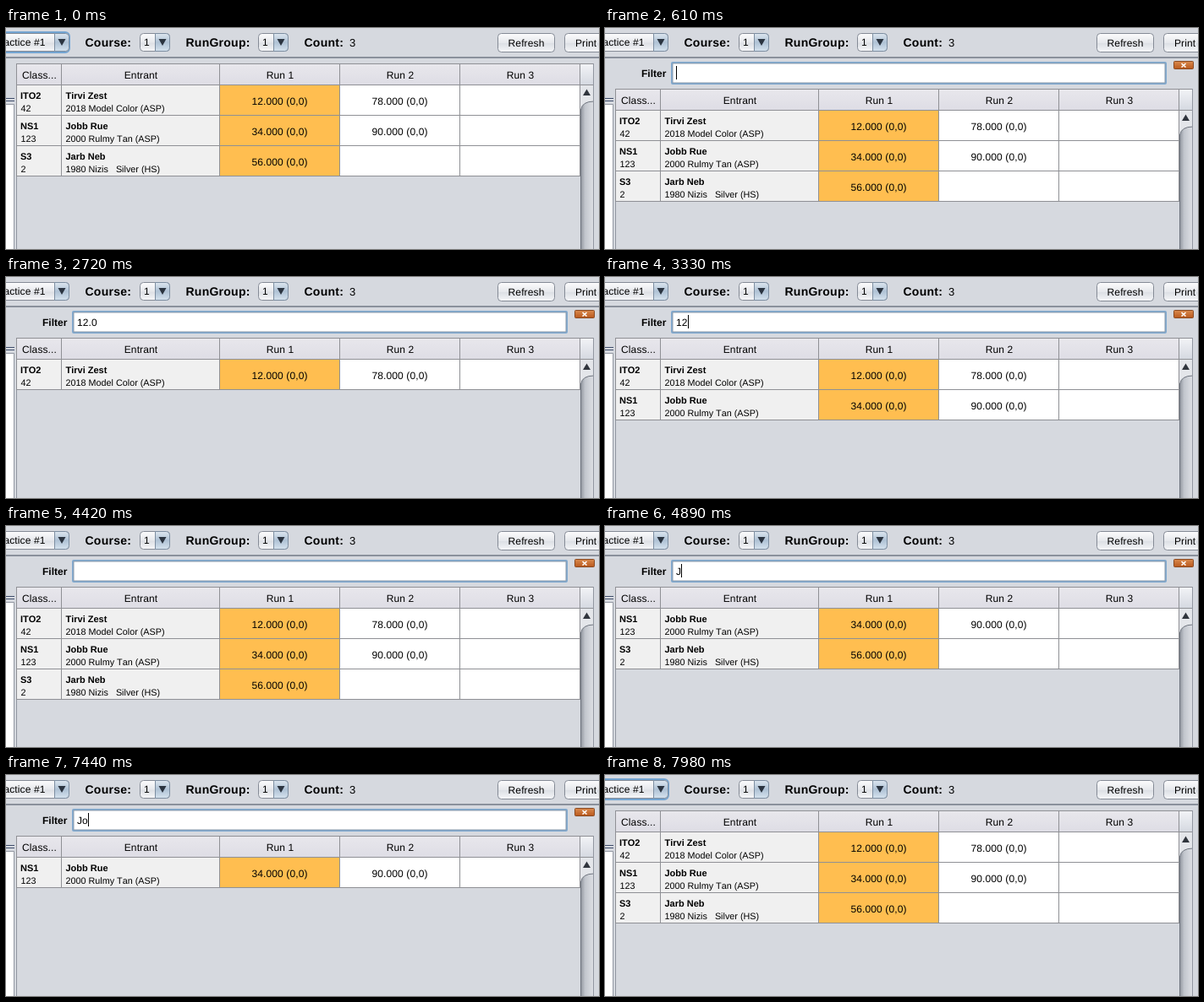
Write an HTML page that moves like this. It is 701 px wide and 262 px high and loops after 8.06 s.

```html
<!DOCTYPE html>
<html lang="en">
<head>
<meta charset="utf-8">
<title>Run table filter</title>
<style>
  html, body { margin: 0; width: 100%; height: 100%; overflow: hidden; background: #d6d9df; }
  svg { display: block; width: 701px; height: 262px; }
  text {
    font: 12px "Liberation Sans", Arial, sans-serif;
    font-kerning: none;
    letter-spacing: .12px;
    text-rendering: geometricPrecision;
    white-space: pre;
  }
  .mid { text-anchor: middle; }
  .label { font-size: 14px; font-weight: bold; letter-spacing: .25px; }
  .bold { font-weight: bold; letter-spacing: 0; }
  .name { font-size: 11px; font-weight: bold; letter-spacing: 0; }
  .small { font-size: 10.8px; letter-spacing: 0; }
</style>
</head>
<body>
<svg viewBox="0 0 701 262">
  <defs>
    <linearGradient id="button" x2="0" y2="1">
      <stop stop-color="#fcfcfd"/><stop offset=".5" stop-color="#e6e8ec"/>
      <stop offset=".55" stop-color="#dde0e5"/><stop offset="1" stop-color="#f6f7f9"/>
    </linearGradient>
    <linearGradient id="arrow" x2="0" y2="1">
      <stop stop-color="#dde6ef"/><stop offset=".5" stop-color="#afc2d5"/>
      <stop offset="1" stop-color="#d5e2ee"/>
    </linearGradient>
    <linearGradient id="head" x2="0" y2="1">
      <stop stop-color="#e8e7ec"/><stop offset="1" stop-color="#dedde5"/>
    </linearGradient>
    <linearGradient id="corner" x2="0" y2="1">
      <stop stop-color="#f3f4f7"/><stop offset="1" stop-color="#d4d8e0"/>
    </linearGradient>
    <linearGradient id="track">
      <stop stop-color="#8b9099"/><stop offset=".35" stop-color="#c2c6cd"/>
      <stop offset="1" stop-color="#dfe1e6"/>
    </linearGradient>
    <linearGradient id="close" x2="0" y2="1">
      <stop stop-color="#d98a4e"/><stop offset="1" stop-color="#b9581c"/>
    </linearGradient>
  </defs>

  <rect width="701" height="262" fill="#d6d9df"/>
  <rect y="34" width="701" height="2" fill="#8a909b"/>
  <path d="M0 83.5H10M0 86.5H10" stroke="#3f4d6b"/>
  <rect y="90" width="9" height="172" fill="#fff"/>
  <path d="M0 90.5H9.5V262" fill="none" stroke="#9297a1"/>

  <g id="toolbar"></g>

  <g id="filter">
    <text class="bold" x="43" y="58">Filter</text>
    <rect x="78" y="40" width="586" height="27" rx="2" fill="#7fa9d0"/>
    <rect x="80" y="42" width="582" height="23" fill="#fff" stroke="#8d9bab"/>
    <text id="query" x="84" y="58"></text>
    <rect id="caret" y="45" width="1" height="16"/>
    <rect x="672.5" y="39.5" width="23" height="9" rx="1" fill="url(#close)" stroke="#8a4a22"/>
    <path d="M681.5 42L686.5 46.5M686.5 42L681.5 46.5" stroke="#fff" stroke-width="1.6"/>
  </g>

  <g id="table"></g>
</svg>

<script>
const $ = id => document.getElementById(id);
const rect = (x, y, w, h, fill, extra = "") =>
  `<rect x="${x}" y="${y}" width="${w}" height="${h}" fill="${fill}" ${extra}/>`;
const text = (x, y, value, style = "") => `<text x="${x}" y="${y}" class="${style}">${value}</text>`;

// Toolbar
const button = (x, w, h = 22) => rect(x + .5, 6.5, w - 1, h, "url(#button)", 'rx="4" stroke="#858b96"');
const combo = (left, right) => button(left, right - left, 21) +
  `<path d="M${right - 17.5} 6.5h13q4 0 4 4v13q0 4 -4 4h-13z" fill="url(#arrow)" stroke="#7d8ea1"/>
   <path d="M${right - 13.5} 13h9l-4.5 8z" fill="#2b3440"/>`;

$("toolbar").innerHTML =
  `<rect id="focus" x="-10" y="5" width="85" height="24" rx="5" fill="none" stroke="#73a4d1" stroke-width="2"/>` +
  combo(-60, 75) + `<text x="46.5" y="21" text-anchor="end">Practice #1</text>` +
  text(93.5, 22, "Course:", "label") + combo(158, 194) + text(163, 21, "1") +
  text(212.5, 22, "RunGroup:", "label") + combo(298, 334) + text(303, 21, "1") +
  text(352.5, 22, "Count:", "label") + `<text x="406" y="22" style="font-size:13px">3</text>` +
  button(581, 68) + text(615, 22, "Refresh", "mid") +
  button(660, 90) + text(673, 22, "Print Cards");

// Table
const edges = [12, 65, 252, 394, 536, 678];
const fills = ["#f0f0f0", "#f0f0f0", "#ffbe50", "#fff", "#fff"];
const titles = ["Class...", "Entrant", "Run 1", "Run 2", "Run 3"];
const rows = [
  ["ITO2", "42", "Tirvi Zest", "2018 Model Color (ASP)", "12.000 (0,0)", "78.000 (0,0)"],
  ["NS1", "123", "Jobb Rue", "2000 Rulmy Tan (ASP)", "34.000 (0,0)", "90.000 (0,0)"],
  ["S3", "2", "Jarb Neb", "1980 Nizis   Silver (HS)", "56.000 (0,0)", ""],
];
const LINE = "#8f9095", ROW = 36, TOP = 68;
const center = i => (edges[i] + edges[i + 1] + 1) / 2;
const cells = (y, h, fill) => edges.slice(0, 5).map((x, i) =>
  rect(x + 1, y, edges[i + 1] - x - 1, h, fill(i))).join("");

const entry = ([cls, number, name, car, ...runs]) =>
  `<g class="row">${rect(12, 0, 667, ROW, LINE)}${cells(0, ROW - 1, i => fills[i])}` +
  text(17, 16, cls, "name") + text(17.5, 31, number, "small") +
  text(70.5, 16, name, "name") + text(70.5, 31, car, "small") +
  runs.map((run, i) => text(center(i + 2), 23, run, "mid")).join("") + "</g>";

$("table").innerHTML =
  rect(12, 42, 667, 26, LINE) + cells(43, 24, () => "url(#head)") +
  titles.map((title, i) => text(center(i) + .5, 60, title, "mid")).join("") +
  rect(12, 68, 1, 230, "#9297a1") +
  rect(679, 42, 16, 26, "url(#corner)") + rect(679, 42, 16, 1, LINE) +
  rect(679, 68, 16, 230, "url(#track)") +
  `<path d="M679 68H695V87Q681 87 680 96H679Z" fill="#e4e6ea"/>
   <path d="M695 87Q681 87 679.5 97V298" fill="none" stroke="#6f757f"/>
   <path d="M682 80h9l-4.5 -7.5z" fill="#30353d"/>` +
  rect(679, 67, 16, 1, LINE) + rect(694, 42, 1, 256, "#9297a1") +
  rows.map(entry).join("");
const rowNodes = document.querySelectorAll(".row");

// [start, query (null = filter closed), caret x (0 = hidden)]
const LOOP = 8060;
const steps = [
  [0, null, 0], [610, "", 84], [1090, "", 0],
  [1240, "1", 91], [1470, "12", 98], [1850, "12.", 101], [2170, "12.0", 108], [2720, "12.0", 0],
  [3030, "12.", 101], [3330, "12", 98], [3650, "1", 91], [3960, "", 84], [4420, "", 0],
  [4890, "J", 90], [5500, "J", 0], [5900, "J", 90], [6370, "J", 0],
  [6450, "Jo", 97], [6910, "Jo", 0], [7440, "Jo", 97], [7900, "Jo", 0],
  [7980, null, 0],
];
const show = (node, visible) => node.style.display = visible ? "" : "none";

function render([, query, caret]) {
  const open = query !== null;
  show($("filter"), open);
  show($("focus"), !open);
  show($("caret"), caret);
  $("caret").setAttribute("x", caret);
  $("query").textContent = query ?? "";
  $("table").setAttribute("transform", `translate(0 ${open ? 30 : 0})`);

  // The query acts as a regular expression over the whole row.
  const pattern = new RegExp(query ?? "");
  let y = TOP;
  rows.forEach((row, i) => {
    const match = pattern.test(row.join(" "));
    show(rowNodes[i], match);
    rowNodes[i].setAttribute("transform", `translate(0 ${y})`);
    if (match) y += ROW;
  });
}

let current;
function tick() {
  const time = performance.now() % LOOP;
  const step = steps.findLast(([start]) => start <= time);
  if (step !== current) render(current = step);
  requestAnimationFrame(tick);
}
tick();
</script>
</body>
</html>
```
